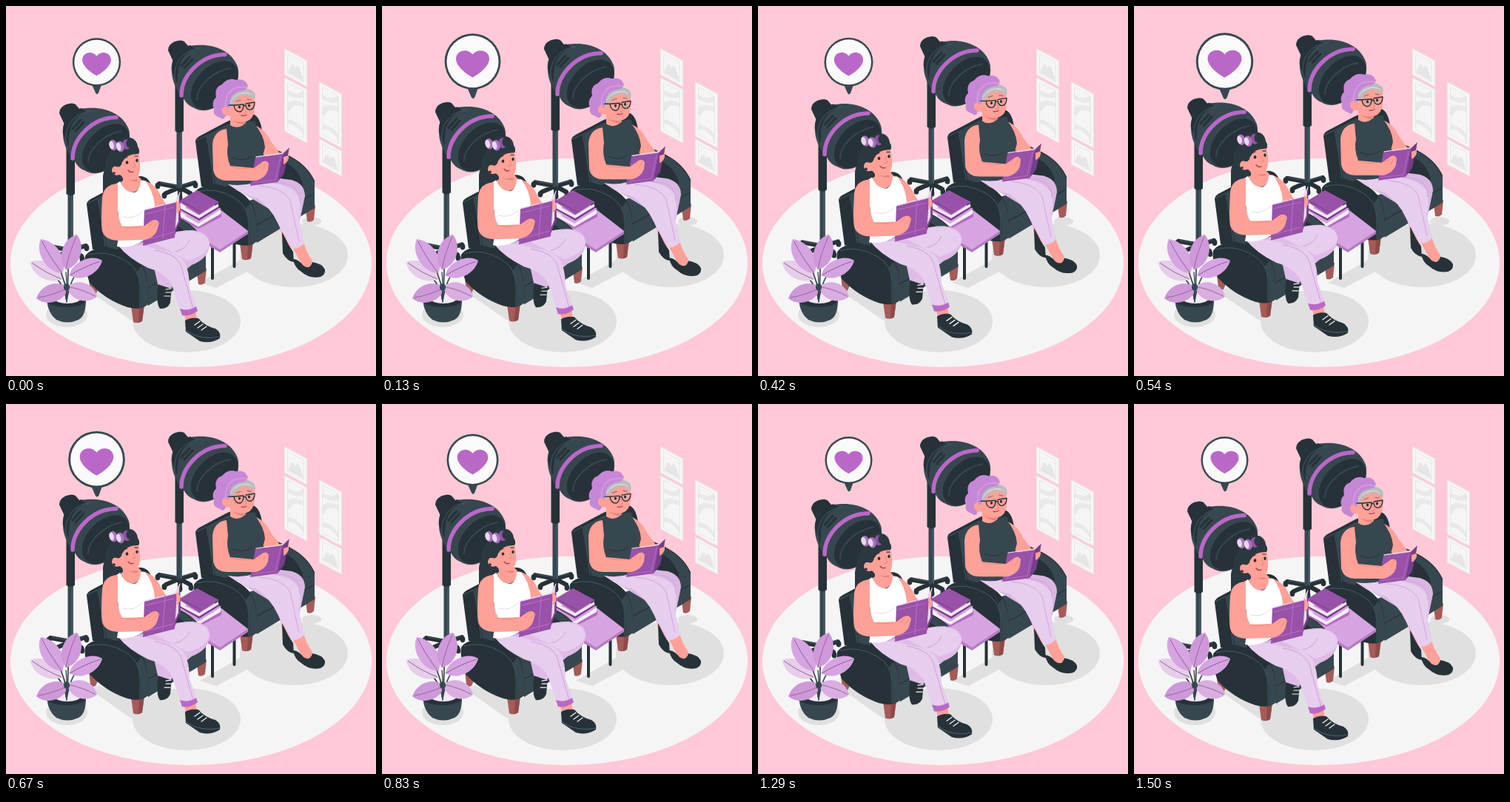
Recreate the animation shown at these times as an HTML page with a canvas. Size 500 px wide and 500 px high, loop 1540 ms.

```html
<!DOCTYPE html>
<html lang="en">
<head>
<meta charset="utf-8">
<title>Hair salon</title>
<style>
html, body { margin: 0; width: 100%; height: 100%; overflow: hidden; background: #ffc9d7; }
canvas { display: block; width: 100vw; height: 100vh; object-fit: contain; }
</style>
</head>
<body>
<canvas id="stage"></canvas>
<script>
const canvas = document.getElementById('stage');
const ctx = canvas.getContext('2d');
const ratio = window.devicePixelRatio || 1;
canvas.width = canvas.height = 500 * ratio;

const LOOP = 1540, CYCLE = 1500;
const INK = '#263238', SLATE = '#37474f', STEEL = '#455a64', HAIR = '#2b383f';
const VIOLET = '#ba68c8', PLUM = '#9852a8', LILAC = '#d6a4e1', PANTS = '#e7cdee';
const SKIN = '#ffa198', SKIN_DARK = '#e8857a', SHADOW = '#e0e0e0';
const HAIR_GREY = '#b9bcbe', WOOD = '#a65b58';

function fill(color, d) {
  ctx.fillStyle = color;
  ctx.fill(new Path2D(d));
}
function line(color, width, d) {
  ctx.strokeStyle = color;
  ctx.lineWidth = width;
  ctx.lineCap = ctx.lineJoin = 'round';
  ctx.stroke(new Path2D(d));
}
function oval(color, x, y, rx, ry = rx, turn = 0) {
  ctx.fillStyle = color;
  ctx.beginPath();
  ctx.ellipse(x, y, rx, ry, turn, 0, Math.PI * 2);
  ctx.fill();
}
function at(x, y, draw) {
  ctx.save();
  ctx.translate(x, y);
  draw();
  ctx.restore();
}

function floor() {
  ctx.fillStyle = '#ffc9d7';
  ctx.fillRect(0, 0, 500, 500);
  oval('#f5f5f5', 250, 347, 244, 141);
  oval(SHADOW, 244, 426, 73, 42);
  oval(SHADOW, 389, 337, 73, 43);
  oval(SHADOW, 82, 417, 28, 17);
  oval(SHADOW, 413, 291, 13, 6);
  fill(SHADOW, 'M112 385 L126 381 L190 405 L190 430 L168 424Z');
  fill(SHADOW, 'M262 374 L330 335 L326 359 L284 381Z');
}

// Isometric picture on the right-hand wall.
function picture(x, y, h, art) {
  ctx.save();
  ctx.transform(1, .54, 0, 1, x, y);
  const layers = [['#ebebeb', 0], ['#f8f8f8', 1.5], ['#e6e6e6', 4], ['#f5f5f5', 5]];
  for (const [color, inset] of layers) {
    ctx.fillStyle = color;
    ctx.fillRect(inset, inset, 31 - 2 * inset, h - 2 * inset);
  }
  ctx.beginPath();
  ctx.rect(5, 5, 21, h - 10);
  ctx.clip();
  art(h);
  ctx.restore();
}
function mountains(h) {
  fill('#e6e6e6', `M5 ${h - 6} L11 13 L15 19 L19 11 L26 ${h - 6}Z`);
  fill('#fafafa', 'M9 17 L11 13 L13 17 L11 16Z M17 15 L19 11 L21 16 L19 14Z');
}
function waves(h) {
  line('#e9e9e9', 6, `M3 18 Q18 20 28 7 M5 40 Q10 24 28 24 M3 ${h - 14} Q17 ${h - 24} 29 ${h - 9}`);
}

// Double heartbeat: time in ms and scale, joined by straight lines.
const BEAT = [[-15, 1], [190, 1.26], [400, 1], [575, 1.26], [975, 1], [LOOP, 1]];
function beatScale(t) {
  const i = BEAT.findIndex(key => t < key[0]);
  const [t0, a] = BEAT[i - 1], [t1, b] = BEAT[i];
  return a + (b - a) * (t - t0) / (t1 - t0);
}
function bubble(scale) {
  ctx.save();
  ctx.translate(122.5, 81);
  ctx.scale(scale, scale);
  ctx.translate(0, -5);
  fill(SLATE, 'M-7 28 L7 28 L2.5 40.5 Q.5 44 -1.5 40.5Z');
  oval(SLATE, 0, 0, 32);
  oval('#fafafa', 0, 0, 29.6);
  fill(VIOLET, 'M0 18 C-8 14 -19 5 -19 -3 C-19 -13 -6 -16 0 -8 C6 -16 19 -13 19 -3 C19 5 8 14 0 18Z');
  ctx.restore();
}

function dryer() {
  line(INK, 6, 'M234 245 L207 240 M235 245 L216 253 M235 245 L255 239 M236 246 L249 253 M235 244 L235 257');
  for (const [x, y] of [[205, 243], [214, 256], [256, 242], [250, 257], [235, 259]]) oval(INK, x, y, 3.4, 4.2);
  line(STEEL, 1, 'M209 239 L233 243 L253 238');
  ctx.fillStyle = SLATE;
  ctx.fillRect(230.5, 165, 7.5, 81);
  ctx.fillStyle = STEEL;
  ctx.fillRect(235.5, 171, 2.5, 73);
  fill(INK, 'M228.5 92 H240 V169 Q234 173 228.5 169Z');
  fill(INK, 'M219 60 Q219 52 228 48 Q237 45 241 48 L247 55 L235 78 L226 75Z');
  fill(SLATE, 'M224 88 C222 67 237 53 257 53 C280 51 305 60 313 82 C318 100 300 126 281 136 C263 143 247 139 240 125 C230 115 224 100 224 88Z');
  fill(INK, 'M224 88 C223 69 235 56 249 53 L256 58 C240 64 230 77 232 106Z');
  line(STEEL, 1, 'M228 99 C226 76 239 60 261 57');
  line(INK, 3, 'M237 81 L248 69 M241 84 L252 72');
  line(VIOLET, 5.5, 'M237 121 C237 95 262 66 296 65.5');
  oval(SLATE, 280, 106, 41, 27, -.82);
  oval(INK, 281.5, 107, 38.5, 24.5, -.82);
  line(SLATE, 2, 'M258 126 C258 109 279 88 303 84');
}

function chair() {
  fill(WOOD, 'M169 405 L187 403 L184 426 Q178 430 172 427Z');
  fill('#8e4a49', 'M180 405 L187 403 L184 426 L179 428Z');
  fill(WOOD, 'M112 370 L127 377 L121 390 Q117 392 114 388Z');
  fill(WOOD, 'M258 360 L271 354 L269 374 Q265 378 260 376Z');
  fill(INK, 'M109 268 Q109 263 118 259 L152 241 L180 230 Q194 229 198 248 L203 275 L235 305 L235 340 L117 329Z');
  fill(SLATE, 'M125 259 L152 245 L190 240 L195 285 L150 330 L136 325Z');
  line(STEEL, 1, 'M110 267 L124 260 Q129 285 134 325');
  fill(INK, 'M200 274 Q223 280 237 288 Q260 300 270 321 L270 357 L250 365 L208 335Z');
  fill(SLATE, 'M215 292 Q246 297 254 325 L254 360 L270 356 L270 324 Q261 304 242 292 Q229 285 212 284Z');
  fill(SLATE, 'M175 350 L253 326 L254 360 L270 351 L270 358 L192 405Z');
  line(INK, 1.2, 'M190 382 L268 339');
  fill(INK, 'M107 338 Q113 328 133 327 Q170 328 185 352 Q193 364 192 403 Q182 412 164 407 Q134 397 113 374 Q105 352 107 338Z');
  fill(SLATE, 'M183 351 Q193 364 192 403 L182 408 Q184 374 177 359Z');
  line(STEEL, 1, 'M111 336 Q136 329 161 344 Q181 355 181 380 L181 407');
}

function olderWoman() {
  fill(SKIN, 'M370 292 L386 309 L384 329 L374 320Z');
  fill(INK, 'M373 305 L382 323 L388 332 L389 346 Q380 345 374 334Z');
  fill(SKIN, 'M385 322 L402 319 Q406 333 414 344 L411 355 L401 352Z');
  fill(INK, 'M388 342 Q395 342 402 351 Q411 357 414 346 Q427 348 431 356 Q432 363 425 366 Q410 369 399 359 Q390 354 388 342Z');
  fill('#d9b7e2', 'M300 241 Q340 228 386 235 Q404 240 404 257 L398 286 L389 320 L372 305 L362 278Z');
  fill(PANTS, 'M300 241 Q335 233 365 240 Q389 244 396 258 Q400 273 396 289 L403 321 Q395 329 386 328 L366 291 Q359 275 340 260 Q318 254 300 241Z');
  line('#d2a5dc', 1, 'M342 243 Q374 245 384 263 L396 318 M363 239 Q398 238 397 265');
  fill(SKIN, 'M332 160 Q349 164 358 183 L370 199 L381 193 Q385 204 376 213 L364 218 L345 198Z');
  fill(SLATE, 'M292 167 Q304 158 315 161 L335 158 Q349 175 350 191 L345 210 Q344 232 335 239 Q317 244 300 241 Q304 216 296 196Z');
  line(INK, 1, 'M306 205 Q320 212 332 203');
  fill(SKIN, 'M303 145 L323 152 L324 158 Q313 168 303 161Z');
  fill(SKIN_DARK, 'M306 154 Q314 158 323 156 L322 160 Q312 160 306 154Z');
  fill(SKIN, 'M298 128 Q304 113 329 114 Q337 123 336 139 Q335 153 325 156 Q311 158 302 148 Q293 150 291 141 Q291 135 298 136Z');
  fill(HAIR_GREY, 'M299 134 Q301 113 322 111 Q340 113 336 127 Q330 119 319 121 Q309 125 306 134 Q303 140 299 134Z');
  line('#e0e0e0', .8, 'M304 129 Q310 116 328 117 M309 123 Q320 114 333 120');
  fill('#c688d6', 'M285 149 Q279 146 281 139 Q277 130 284 123 Q281 110 292 106 Q300 96 311 100 Q323 97 327 108 Q325 115 316 115 Q302 119 302 134 Q301 140 296 139 Q299 151 293 153Z');
  line(LILAC, 1.2, 'M297 140 Q294 121 307 112 Q315 108 325 110');
  fill(SKIN, 'M298 136 Q291 135 292 143 Q295 150 301 146Z');
  oval(INK, 315.5, 136.5, 1.6, 2);
  oval(INK, 328.5, 134.5, 1.6, 2);
  line(INK, 1.4, 'M301 134 L308 134 Q309 143 316 143 Q321 142 321 133 L308 134 M321 135 L324 134 Q325 141 331 140 Q336 138 336 130 L324 132');
  line('#777', 1.2, 'M311 129 L317 127 M326 126 L331 127');
  line(SKIN_DARK, 1, 'M323 137 L325 144 L321 145');
  line('#a83e45', 1.3, 'M318 148 Q322 149 325 147');
  fill(PLUM, 'M337 205 L374 200 Q371 221 367 238 L330 243Z');
  fill('#763d89', 'M374 200 L383 191 L376 226 L367 238Z');
  line('#e7d8e9', 1.3, 'M338 204 L373 199 L382 191');
  line(VIOLET, 1, 'M334 239 L364 235 L371 204');
  fill(SKIN, 'M298 166 Q281 168 279 187 L280 222 Q283 236 300 236 L338 236 Q351 232 354 222 L355 213 Q352 207 346 211 L335 219 L303 216 Q297 201 300 187Z');
  line(SKIN_DARK, .8, 'M302 216 Q311 221 330 219 M346 211 L342 218 M352 212 L347 221');
  fill(SKIN, 'M375 204 L382 202 Q383 210 375 214Z');
}

function table() {
  line(INK, 4, 'M279 324 V368 M308.5 311 V352');
  fill('#b77bc4', 'M227 291 L278 267 L327 304 V308 L289 333 L227 296Z');
  fill(LILAC, 'M227 290 L278 266 L327 304 L289 329Z');
  fill('#b06cbc', 'M234 283 L260 299 L291 279 V285 L260 301 L234 288Z');
  fill('#f7edf8', 'M234 279 L260 294 L290 275 V281 L260 298 L234 284Z');
  fill(LILAC, 'M234 277 L263 260 L291 274 L260 292Z');
  fill('#763d89', 'M233 270 L261 286 L288 269 V273 L261 290 L233 274Z');
  fill('#f5eaf6', 'M233 268 L261 283 L287 267 V271 L261 287 L233 272Z');
  fill(PLUM, 'M233 264 L258 249 L288 265 L261 282Z');
  line('#763d89', 1, 'M239 265 L263 278');
}

function shoe() {
  fill(INK, 'M242 425 Q250 420 260 422 Q268 432 283 436 Q291 441 289 449 Q277 457 262 453 L243 440Z');
  line(STEEL, 1.2, 'M243 438 Q260 452 288 447');
  line('#f5f5f5', 1.3, 'M255 431 L262 426 M259 435 L266 430 M264 438 L271 433');
}

function youngerWoman() {
  fill(INK, 'M206 376 Q216 372 224 379 L222 401 Q218 410 208 409 Q202 401 206 376Z');
  line('#f5f5f5', 1.2, 'M216 383 L223 382 M216 387 L223 387 M214 392 L222 392');
  fill(SKIN, 'M240 413 L256 411 L258 423 Q249 431 243 426Z');
  shoe();
  fill('#dfbbe7', 'M174 323 Q223 302 253 303 Q276 306 275 323 Q274 341 251 350 L234 364 L223 382 L205 376 L198 344Z');
  fill(PANTS, 'M196 318 Q225 304 250 304 Q274 307 275 321 Q273 336 246 344Z');
  fill(PANTS, 'M151 323 Q179 320 205 329 Q231 332 241 345 Q248 359 248 380 L258 408 Q247 416 236 411 L223 374 Q212 359 192 354 Q165 341 151 323Z');
  line('#cda0d8', 1, 'M201 330 Q236 335 239 360 L253 409 M229 332 Q242 329 248 317');
  fill(VIOLET, 'M235 409 Q246 413 257 406 L259 412 Q249 420 238 418Z');
  fill(HAIR, 'M150 212 Q133 212 131 230 L131 252 L145 250 L160 238Z');
  fill(SKIN, 'M184 235 Q202 239 210 258 L218 271 L230 264 Q237 267 236 278 Q232 288 220 290 L200 282Z');
  fill(SKIN, 'M158 222 L178 229 L186 238 Q177 256 162 251 L150 241 L158 236Z');
  fill('#fff', 'M146 242 L154 237 Q161 253 174 252 Q182 248 182 236 L188 236 Q199 250 201 269 L195 289 Q196 309 186 317 Q169 328 150 325 Q156 292 149 267Z');
  line('#dedede', 1, 'M158 285 Q173 289 184 278');
  fill(SKIN_DARK, 'M160 230 Q168 236 177 234 L178 237 Q166 238 160 230Z');
  fill(HAIR, 'M136 228 Q130 208 141 198 Q145 181 158 178 Q176 175 178 190 Q183 198 175 205 L156 207 L154 225 Q148 240 139 236Z');
  fill(SKIN, 'M155 208 Q161 195 178 195 Q182 210 181 222 Q179 234 170 235 Q160 235 154 228 Q144 231 143 222 Q144 215 151 217Z');
  fill(HAIR, 'M142 207 Q149 191 173 186 Q183 193 179 200 Q163 199 157 211 Q155 219 150 217 L142 215Z');
  oval('#8d52a1', 163, 187, 5.5, 7, -.2);
  oval(HAIR, 167, 186, 4.5, 6, -.2);
  for (const [x, y] of [[143.5, 188], [153, 190]]) {
    oval('#a872ba', x + 1.4, y, 5.3, 7.3, -.25);
    oval('#ead7ef', x - .8, y, 3.2, 5.6, -.25);
  }
  oval(INK, 146, 226, 1.8);
  oval(INK, 163.5, 211.5, 1.8, 2.2);
  oval(INK, 177, 208.8, 1.7, 2.2);
  line(INK, 1.2, 'M159 206 L164 204 M174 203 L178 203');
  line(SKIN_DARK, 1, 'M172 210 L175 217 L171 218');
  line('#a83e45', 1.4, 'M165 222 Q168 226 172 224');
  fill('#763d89', 'M228 267 L235 251 L236 290 L226 314Z');
  fill('#ead7ef', 'M227 267 L234 253 L233 291 L227 305Z');
  fill(PLUM, 'M187 276 L231 265 L228 313 L185 324Z');
  line('#ead7ef', 1.2, 'M187 275 L231 264 L235 252');
  line(VIOLET, 1.2, 'M189 281 L226 272 M188 316 L226 306 M215 268 L212 314');
  fill(SKIN, 'M151 240 Q132 241 130 259 Q128 293 130 304 Q134 317 154 317 L187 316 Q200 313 204 304 L207 293 Q204 287 197 290 L187 297 L157 298 Q150 285 151 267Z');
  line(SKIN_DARK, .8, 'M157 298 Q169 301 183 298 M200 290 L193 298 M206 292 L198 301');
  fill(SKIN, 'M230 263 Q237 266 235 276 L231 281Z');
}

// Leaf between base and tip, with a centre vein.
function leaf(x0, y0, x1, y1, width, color) {
  const dx = x1 - x0, dy = y1 - y0, len = Math.hypot(dx, dy);
  ctx.save();
  ctx.translate(x0, y0);
  ctx.rotate(Math.atan2(dy, dx));
  fill(color, `M0 0 C${len * .2} ${-width} ${len * .8} ${-width} ${len} 0 C${len * .75} ${width} ${len * .2} ${width} 0 0Z`);
  line('#97689f', .9, `M0 0 Q${len * .5} -3 ${len * .94} 0`);
  ctx.restore();
}
function plant() {
  fill(SLATE, 'M55 397 Q82 386 108 397 Q108 419 98 424 Q83 431 68 424 Q57 416 55 397Z');
  oval(INK, 81.5, 398, 26, 9);
  oval('#f3e8f5', 83, 395, 18, 7);
  line(SLATE, 1.7, 'M82 400 Q84 374 84 352 M82 398 Q82 372 69 350 M82 398 Q87 370 96 361 M82 398 Q78 376 66 366');
  leaf(75, 369, 33, 346, 15, '#e6cdea');
  leaf(76, 361, 47, 315, 17, LILAC);
  leaf(81, 356, 96, 309, 17, '#cf98da');
  leaf(86, 364, 130, 344, 15, LILAC);
  leaf(83, 379, 123, 393, 16, '#d9aee1');
  leaf(84, 381, 41, 395, 16, '#cd99d8');
  oval(SLATE, 82, 380, 4, 5);
  line(SLATE, 1.4, 'M81 396 Q83 375 81 360');
}

function render(t) {
  const lift = -10 * (1 - Math.abs(1 - 2 * (t % CYCLE) / CYCLE));
  ctx.setTransform(ratio, 0, 0, ratio, 0, 0);
  floor();
  picture(376, 57, 36, mountains);
  picture(376, 96, 73, waves);
  picture(423, 102, 74, waves);
  picture(423, 179, 35, mountains);
  bubble(beatScale(t));
  at(0, lift, () => {
    dryer();
    at(147, -85, chair);
    olderWoman();
  });
  table();
  at(0, lift, () => {
    at(-147, 85, dryer);
    chair();
    youngerWoman();
  });
  plant();
}

function frame() {
  render(performance.now() % LOOP);
  requestAnimationFrame(frame);
}
frame();
</script>
</body>
</html>
```
